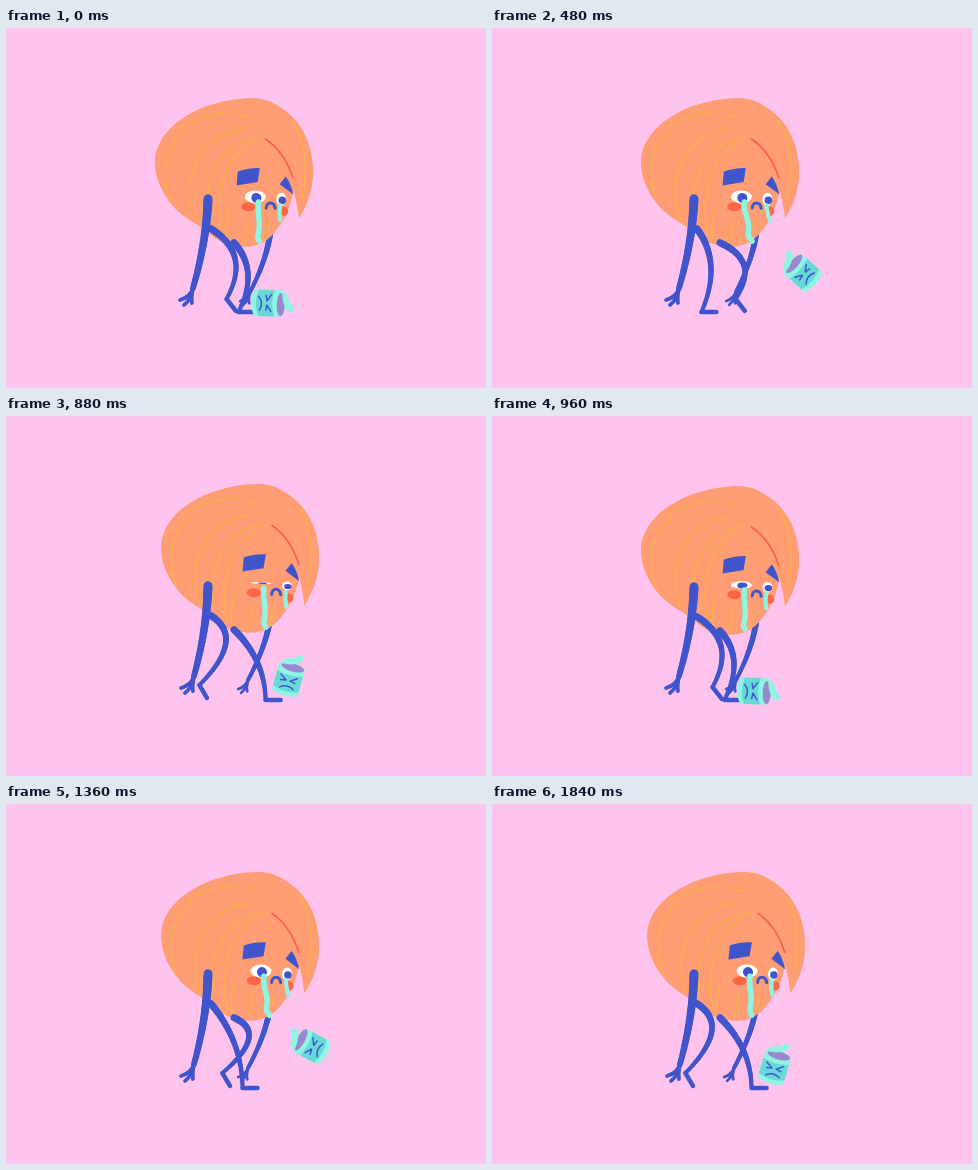
An HTML page with a canvas that plays this animation: 480 by 360 pixels, repeating every 1.92 s.

```html
<!DOCTYPE html>
<html lang="en">
<head>
<meta charset="utf-8">
<title>Sad walk</title>
<style>
html, body { margin: 0; width: 100%; height: 100%; overflow: hidden; background: #ffc4ee; }
canvas { display: block; }
</style>
</head>
<body>
<canvas id="stage" width="480" height="360"></canvas>
<script>
const ctx = document.getElementById('stage').getContext('2d');
const PINK = '#ffc4ee', SKIN = '#ff9d74', STRIPE = '#fbb04e', BLUE = '#4054cc',
      CYAN = '#8ff4e2', TEAL = '#66d9d8', PURPLE = '#9a88cf', RED = '#ff5c4e';
const STEP = 80, STEPS = 24, CYCLE = 12, STRIDE = CYCLE / 2;
const { PI, sin, cos, max, abs } = Math;

const SHELL = new Path2D(`M292 186 C302 170 307 150 305 132 C302 104 289 84 268 73
  C258 66 244 65 232 67 C220 68 210 71 198 75 C170 86 150 104 147 128
  C146 148 156 166 170 180 C180 189 192 194 200 200 C210 211 224 215 238 215
  C254 215 264 206 270 197 C278 187 283 175 286 158 C289 168 291 178 292 186 Z`);
const STRIPES = new Path2D(`M172 97 Q190 84 222 80 M230 84 L242 85
  M177 100 C158 113 152 142 163 170 M236 98 C200 98 174 138 184 178 L188 188
  M250 107 C212 108 194 150 201 192 M243 112 C218 124 206 160 215 204
  M222 178 Q218 192 220 207 M240 188 Q241 200 236 211 M262 190 Q260 200 254 209
  M284 88 Q303 118 295 165`);
const CURL = new Path2D('M257 107 Q276 119 285 145');

// Cosine wave that is 1 when p equals peak.
const wave = (p, peak, period) => cos((p - peak) * 2 * PI / period);

function fill(color, path) {
  ctx.fillStyle = color;
  ctx.fill(path);
}

function stroke(color, width, path) {
  ctx.strokeStyle = color;
  ctx.lineWidth = width;
  ctx.stroke(path);
}

function oval(color, x, y, rx, ry = rx) {
  const path = new Path2D();
  path.ellipse(x, y, rx, ry, 0, 0, 7);
  fill(color, path);
}

function line(width, ...pts) {
  stroke(BLUE, width, new Path2D('M' + pts.join(' ')));
}

// Runs paint with the origin at x, y.
function at(x, y, degrees, sx, sy, paint) {
  ctx.save();
  ctx.translate(x, y);
  ctx.rotate(degrees * PI / 180);
  ctx.scale(sx, sy);
  paint();
  ctx.restore();
}

// Tapered curve from a to c whose middle is pushed forward by bow.
function limb(a, c, bow, w0, w1) {
  const point = t => [0, 1].map(n =>
    a[n] + (c[n] - a[n]) * t + (n ? -.3 : 1) * 4 * bow * t * (1 - t));
  for (let i = 0; i < 24; i++)
    line(w0 + (w1 - w0) * i / 23, ...point(i / 24), ...point((i + 1) / 24));
}

// p = 2: foot reaches forward, p = 8: foot leaves the ground.
function leg(x, y, p) {
  const lift = max(0, sin((p - 8) * PI / 6));
  const foot = [x + 10 + 53 * wave(p, 2.8, CYCLE), 284 - 15 * lift];
  limb([x, y], foot, 14 - 9 * wave(p, 3.5, CYCLE), 7, 4);
  const tilt = lift * PI / 3;
  line(4.5, ...foot, foot[0] + 15 * cos(tilt), foot[1] + 15 * sin(tilt));
}

function arm(x, y, hx, hy, width, size) {
  limb([x, y], [hx, hy], 3, width, width * .65);
  for (const [dx, dy] of [[-13, 12], [-9, 17], [-1, 15]])
    stroke(BLUE, 3.8 * size, new Path2D(
      `M${hx} ${hy} Q${hx - 2} ${hy + dy * size * .7} ${hx + dx * size} ${hy + dy * size}`));
}

function eye(x, y, rx, ry, pupil, shut) {
  at(x, y, 0, 1, 1 - shut, () => {
    oval('#fff', 0, 0, rx, ry);
    oval(BLUE, 1, 1, pupil);
  });
}

function face(shut, sway) {
  fill(BLUE, new Path2D('M230 140 Q240 136 252 136 L250 150 L229 154 Z'));
  fill(BLUE, new Path2D('M278 144 Q283 150 286 162 L272 152 Z'));
  oval('#ff6647', 241, 175, 7, 4.5);
  oval('#ff6647', 277, 179, 4, 4.5);
  eye(248, 165, 10.5, 6.5, 5, shut);
  eye(274, 167, 5, 6.5, 3.8, shut * .4);
  stroke(CYAN, 5.5, new Path2D(
    `M251 170 C250 182 ${255 + sway / 2} 187 ${254 + sway / 2} 197 S${253 + sway} 204 ${256 + sway} 209`));
  stroke(CYAN, 4, new Path2D(`M273 173 Q${273 + sway / 3} 180 ${275 + sway / 2} 188`));
  stroke(BLUE, 3, new Path2D('M259 176 C259 169 267 169 268 176'));
}

function shell(dx, dy, p, shut) {
  const turn = .7 + 1.2 * wave(p, 4.7, STRIDE), sway = -4 * wave(p, 1, CYCLE);
  at(225 + dx, 150 + dy, turn, 1, 1, () => {
    ctx.translate(-225, -150);
    fill(SKIN, SHELL);
    stroke(STRIPE, 1.5, STRIPES);
    stroke(RED, 1.6, CURL);
    face(shut, sway);
  });
}

// Kicked forward and up, spins back, bounces, then topples over.
function can(p) {
  const x = 261 + 55 * sin(PI / 2 * (p < 8 ? p / 8 : (12 - p) / 4));
  const y = 275 - (p < 9.5 ? 32 * sin(PI * p / 9.5) : 11 * sin(PI * (p - 9.5) / 2.5));
  const turn = p < 5 ? 92 - 154 * sin(PI / 2 * p / 5) : -62 + 13 * (p - 5);
  at(x, y, turn, 1.06, 1.06, () => {
    fill(CYAN, new Path2D('M-12.5 -13 L12.5 -13 L12.5 12 Q0 18 -12.5 12 Z'));
    fill(TEAL, new Path2D('M-12.5 -7 Q0 -3 12.5 -7 L12.5 8 Q0 13 -12.5 8 Z'));
    oval(CYAN, 0, -13, 12.5, 4.5);
    oval(PURPLE, 1, -13, 11, 3.8);
    fill(CYAN, new Path2D('M-12 -14 Q-9 -20 0 -22 Q5 -28 8 -25 Q9 -20 3 -17 Q-3 -14 -12 -14 Z'));
    for (const side of [-1, 1])
      line(1.4, 8 * side, -4, 2 * side, 0, 7 * side, 1);
    stroke(BLUE, 1.4, new Path2D('M-6 8 Q0 3 7 7'));
  });
}

// Open star: sharp tips joined by inward curves.
function burst(x, y, size) {
  const spot = (i, r) => `${r * cos(i * PI / 4)} ${r * sin(i * PI / 4)} `;
  let d = 'M' + spot(-.3, 21);
  for (let i = 0; i < 5; i++) d += 'Q' + spot(i + .2, 13) + spot(i + .7, 23);
  at(x, y, 0, size, size, () => stroke(RED, 1.5, new Path2D(d)));
}

function draw(step) {
  const p = step % CYCLE;
  const dx = 3.5 + 6 * wave(p, 4.2, STRIDE), dy = 3.5 + 2.5 * wave(p, 1.5, STRIDE);
  const reach = wave(p, 2, STRIDE);
  const shut = max(0, ...[11, 21].map(blink => .86 - .43 * abs(step - blink)));

  ctx.fillStyle = PINK;
  ctx.fillRect(0, 0, 480, 360);
  arm(264, 203 + dy, 246 + 4 * reach, 264, 6, .75);
  shell(dx, dy, p, shut);
  leg(228, 213 + dy * .5, p + STRIDE);
  leg(205, 199 + dy * .5, p);
  arm(202, 169 + dy * .5, 186 - 2 * reach, 260, 9, 1);
  if (p === 1 || p === 2) burst(279, 262, p / 2);
  can(p);
}

function tick() {
  draw(Math.floor(performance.now() / STEP) % STEPS);
  requestAnimationFrame(tick);
}

ctx.lineCap = ctx.lineJoin = 'round';
tick();
</script>
</body>
</html>
```
